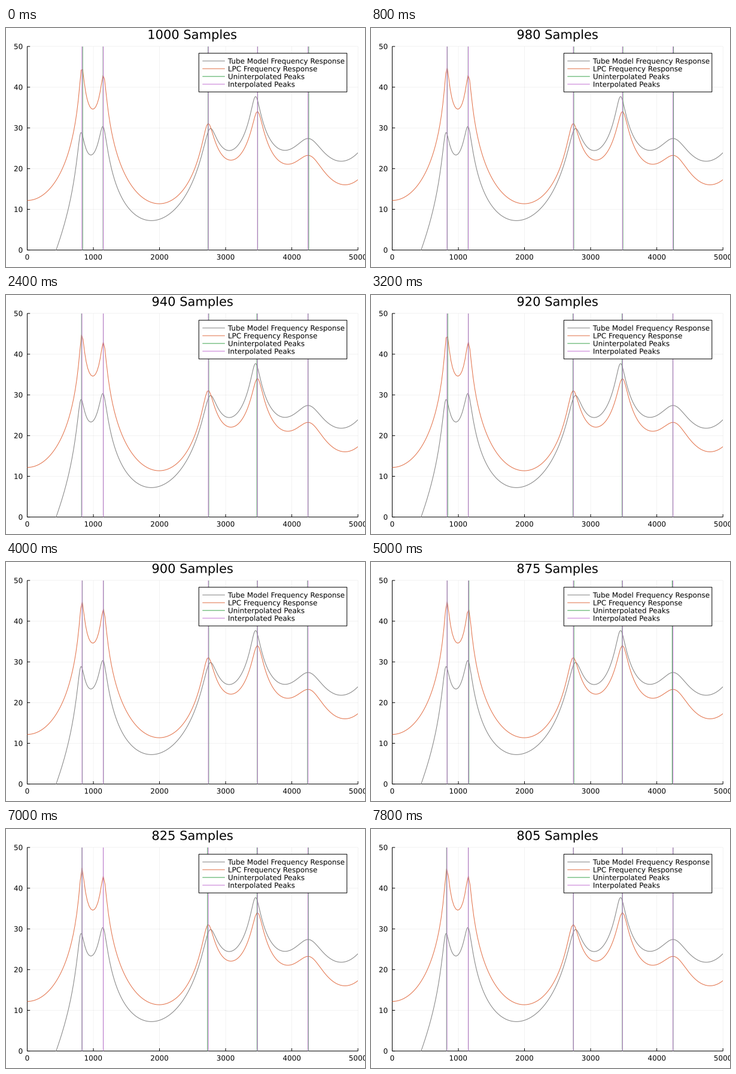
A matplotlib script that plays this animation: 600x400 px, repeating every 8000 ms.

```python
import numpy as np
import matplotlib.pyplot as plt
from matplotlib.animation import FuncAnimation
from matplotlib.patches import PathPatch, Rectangle
from matplotlib.textpath import TextPath
from matplotlib.transforms import Affine2D

W, H, DPI = 600, 400, 100
LEFT, RIGHT, TOP, BOTTOM = 35.47, 588.19, 30.87, 371.61
F_MAX, DB_MAX, NYQUIST = 5000, 50, 22050
GRAY, ORANGE, GREEN, PURPLE = "#808080", "#e26f46", "#3da44d", "#c271d2"
PX = 72 / DPI

fig = plt.figure(figsize=(W / DPI, H / DPI), dpi=DPI, facecolor="white")
ax = fig.add_axes([0, 0, 1, 1])
ax.set_xlim(0, W)
ax.set_ylim(H, 0)
ax.axis("off")
plot_area = Rectangle((LEFT, TOP), RIGHT - LEFT, BOTTOM - TOP,
                      transform=ax.transData)


def to_x(freq):
    return LEFT + (RIGHT - LEFT) * np.asarray(freq) / F_MAX


def to_y(db):
    return BOTTOM - (BOTTOM - TOP) * np.asarray(db) / DB_MAX


def line(x, y, color, width=1.0, z=2, clip=False, **kw):
    art, = ax.plot(x, y, color=color, lw=width * PX, zorder=z, snap=False,
                   solid_capstyle="butt", **kw)
    if clip:
        art.set_clip_path(plot_area)
    return art


def text_path(s, x, y, size, align=0.0):
    """Outline of s with its baseline at y; align 0 left, 0.5 centre, 1 right."""
    path = TextPath((0, 0), s, size=size)
    box = path.get_extents()
    shift = align * (box.x0 + box.x1) if align == 0.5 else align * box.x1
    return path.transformed(Affine2D().translate(-shift, 0).scale(1, -1)
                            .translate(x, y))


def label(*args):
    patch = PathPatch(text_path(*args), fc="black", lw=0, zorder=8, snap=False)
    ax.add_patch(patch)
    return patch


def resonator(peaks, dips, slope=0):
    """Pole-pair response whose maxima and dips meet the given (Hz, dB)."""
    f_peak, h_peak = np.array(peaks, float).T
    f_dip, h_dip = np.array(dips, float).T
    centre = f_peak.copy()
    band = np.array([28, 28, 60, 50, 150.0])
    window = np.array([40, 40, 80, 80, 150])

    def poles(f):
        f = np.asarray(f, float)[:, None]
        gain = ((f - centre)**2 + band**2) * ((f + centre)**2 + band**2) / 1e12
        return (-10 * np.log10(gain).sum(axis=1)
                + slope * np.log10(np.maximum(f[:, 0], 1)))

    def response(f):
        return poles(f) + np.polyval(tail, (np.asarray(f) / F_MAX)**2)

    for _ in range(150):
        tail = np.polyfit((f_dip / F_MAX)**2, h_dip - poles(f_dip), 5)
        tops = []
        for f, w in zip(f_peak, window):
            grid = np.linspace(f - w, f + w, 161)
            db = response(grid)
            tops.append((grid[db.argmax()], db.max()))
        f_top, h_top = np.array(tops).T
        centre[:] = np.clip(centre + 0.4 * (f_peak - f_top),
                            f_peak - 40, f_peak + 40)
        band[:] = np.clip(band * 10**((h_top - h_peak) / 40), 10, 320)
    return response


tube = resonator(
    [(815, 28.9), (1143, 30.35), (2772, 29.85), (3452, 37.7), (4247, 27.4)],
    [(435, 0), (965, 23.2), (1885, 7.3), (3055, 24.4), (3890, 24.5),
     (4752, 21.8), (5000, 23.9)], slope=20)
lpc = resonator(
    [(827, 44.95), (1152, 43.0), (2737, 31.1), (3481, 34.05), (4246, 23.25)],
    [(0, 12.3), (988, 34.4), (2000, 11.5), (3080, 22.0), (3940, 21.1),
     (4810, 16.0), (5000, 17.3)])


def find_peaks(freq, db):
    """Highest bins, and the tops of parabolas through their neighbours."""
    mid = db[1:-1]
    k = 1 + np.flatnonzero((mid > db[:-2]) & (mid >= db[2:]) & (freq[1:-1] < 4700))
    a, b, c = db[k - 1], db[k], db[k + 1]
    return freq[k], freq[k] + 0.5 * (a - c) / (a - 2 * b + c) * freq[1]


def vlines(freqs):
    x = np.repeat(to_x(freqs), 3)
    y = np.tile([BOTTOM, TOP, np.nan], len(freqs))
    return x, y


# Grid, axes and tick labels
for f in range(0, F_MAX + 1, 1000):
    x = to_x(f)
    line([x, x], [TOP, BOTTOM], "black", 0.5, 1, alpha=0.1)
    line([x, x], [BOTTOM, BOTTOM - 4.7], "black")
    label(str(f), x, 387.6, 12, 0.5)
for db in range(0, DB_MAX + 1, 10):
    y = to_y(db)
    line([LEFT, RIGHT], [y, y], "black", 0.5, 1, alpha=0.1)
    line([LEFT, LEFT + 4.7], [y, y], "black")
    label(str(db), 27.4, y + 4.4, 12, 1.0)
line([LEFT, RIGHT], [BOTTOM, BOTTOM], "black")
line([LEFT, LEFT], [TOP, BOTTOM], "black")

# Series
f_tube = np.arange(100, F_MAX + 11, 10)
line(to_x(f_tube), to_y(tube(f_tube)), GRAY, z=3, clip=True)
lpc_line = line([], [], ORANGE, z=4, clip=True)
raw_lines = line([], [], GREEN, z=5, clip=True)
fine_lines = line([], [], PURPLE, z=6, clip=True)

# Legend
ROW = 12.96
ax.add_patch(Rectangle((322.3, 42.2), 247.5, 5 * ROW, fc="white", ec="black",
                       lw=PX, zorder=7, snap=False))
names = ["Tube Model Frequency Response", "LPC Frequency Response",
         "Uninterpolated Peaks", "Interpolated Peaks"]
for i, (name, color) in enumerate(zip(names, (GRAY, ORANGE, GREEN, PURPLE))):
    y = 42.2 + ROW * (i + 1)
    line([328.3, 365.8], [y, y], color, z=8)
    label(name, 370.9, y + 4.4, 12)

title = label("1000 Samples", 311.8, 18.3, 21, 0.5)


def draw(i):
    n = 1000 - 5 * i
    step = NYQUIST / n
    freq = np.arange(0, F_MAX + 2 * step, step)
    db = lpc(freq)
    raw, fine = find_peaks(freq, db)
    lpc_line.set_data(to_x(freq), to_y(db))
    raw_lines.set_data(*vlines(raw))
    fine_lines.set_data(*vlines(fine))
    title.set_path(text_path(f"{n} Samples", 311.8, 18.3, 21, 0.5))
    return lpc_line, raw_lines, fine_lines, title


anim = FuncAnimation(fig, draw, frames=40, interval=200, repeat=True,
                     repeat_delay=0, blit=False)
plt.show()
```
